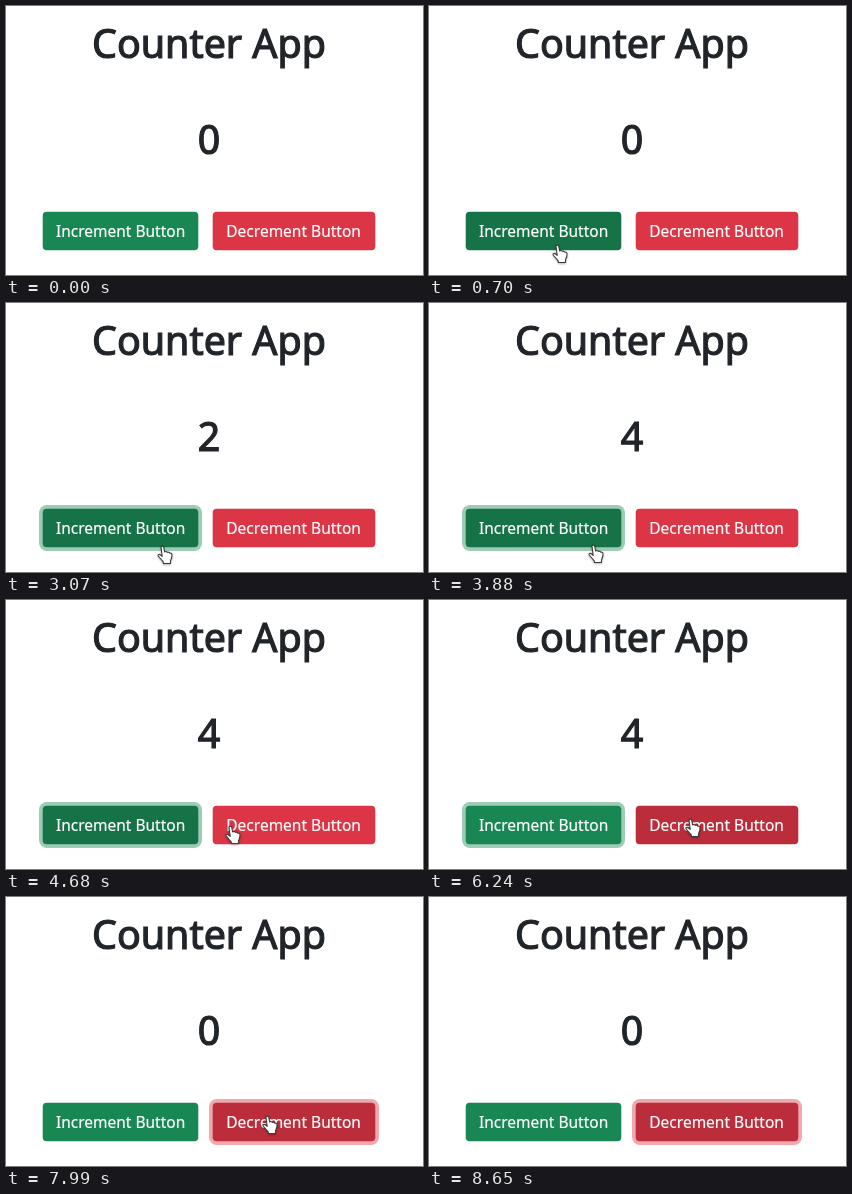
An HTML page that plays this animation: 417x269 px, repeating every 8750 ms.

```html
<!DOCTYPE html>
<html lang="en">
<head>
<meta charset="utf-8">
<title>Counter App</title>
<style>
  html, body { margin: 0; width: 100%; height: 100%; overflow: hidden; background: #fff; }
  svg { display: block; }
  text { font-family: "Noto Sans", "Open Sans", sans-serif; text-anchor: middle; }
  .head { font-size: 39.4px; fill: #212529; stroke: #212529; stroke-width: 1.2; }
  .label { font-size: 15.5px; fill: #fff; stroke: #fff; stroke-width: .2; }
  #cursor { filter: drop-shadow(0 1px 1px rgba(0, 0, 0, .3)); }
  #cursor path { fill: #fff; stroke: #3a3a3a; stroke-width: 1.1; stroke-linejoin: round; }
</style>
</head>
<body>
<svg width="417" height="269" viewBox="0 0 417 269">
  <text class="head" x="203" y="51.7">Counter App</text>
  <text class="head" id="count" x="203" y="147.8">0</text>
  <g id="inc">
    <rect class="ring" x="33" y="202" width="163" height="46" rx="8"/>
    <rect class="face" x="36.7" y="205.7" width="155.6" height="38.6" rx="4"/>
    <text class="label" x="114.6" y="231">Increment Button</text>
  </g>
  <g id="dec">
    <rect class="ring" x="203" y="202" width="170" height="46" rx="8"/>
    <rect class="face" x="206.7" y="205.7" width="162.6" height="38.6" rx="4"/>
    <text class="label" x="287.6" y="231">Decrement Button</text>
  </g>
  <g id="cursor">
    <path id="hand" d="M4 2.5C4 .7 6.5 .7 6.8 2.5L7.6 7C8.5 6.2 9.8 6.4 10.2 7.4 11.2 6.8 12.4 7.2 12.7 8.2 14 7.8 15 8.6 15 10 15 13 14.3 14 13.6 15.5L13.4 18.5H6.5L6 16.5C4.5 15 2.5 12.5 1.2 11 .6 9.6 2.3 8.8 3.6 10L5.2 11.4Z"/>
    <path id="arrow" d="M5 1V15L8.2 12 10.4 17 12.6 16 10.4 11.2H14.6Z"/>
  </g>
</svg>
<script>
const LOOP = 8750, STEP = 90, FADE = 150, LAG = 120;
const ENTER = 110, EXIT = 8640;

const ups = [1000, 2570, 3250, 3720];
const downs = [6460, 6940, 7420, 7990];
const firstPress = 800, switchPress = 6240;

// Cursor stops: time, x, y
const stops = [
  [ENTER, 150, 262], [420, 123, 238], [1330, 123, 238], [1840, 223, 240],
  [2050, 236, 251], [2430, 151, 242], [3070, 151, 242], [3880, 159, 241],
  [4400, 174, 233], [4660, 219, 225], [4970, 256, 218], [8270, 256, 218],
  [EXIT, 262, 240]
];

const buttons = [
  { id: "inc", left: 37, right: 192, base: [25, 135, 84], dark: [21, 115, 71],
    ring: "rgb(60,153,110)", focus: t => ramp(t - firstPress) - ramp(t - switchPress) },
  { id: "dec", left: 207, right: 369, base: [220, 53, 69], dark: [187, 45, 59],
    ring: "rgb(225,83,97)", focus: t => ramp(t - switchPress) }
];

const el = id => document.getElementById(id);
const mix = (a, b, p) => a + (b - a) * p;
const ramp = dt => Math.min(1, Math.max(0, dt / FADE));
const passed = (times, t) => times.filter(at => at <= t).length;

function cursorAt(t) {
  const i = stops.findIndex(s => s[0] > t);
  if (i < 1) return (i < 0 ? stops[stops.length - 1] : stops[0]).slice(1);
  const [t0, x0, y0] = stops[i - 1], [t1, x1, y1] = stops[i];
  const p = ((t - t0) / (t1 - t0)) ** 3;
  return [mix(x0, x1, p), mix(y0, y1, p)];
}

function isOver(b, [x, y]) {
  const tipX = x + 5, tipY = y + 1;
  return tipX > b.left && tipX < b.right && tipY > 206 && tipY < 244;
}

// Averaging recent hover gives a linear fade in and out
function hoverLevel(b, t) {
  const samples = 12;
  let hits = 0;
  for (let k = 0; k < samples; k++) {
    hits += isOver(b, cursorAt(t - LAG - FADE * k / samples));
  }
  return hits / samples;
}

for (const b of buttons) {
  b.face = document.querySelector(`#${b.id} .face`);
  b.glow = document.querySelector(`#${b.id} .ring`);
  b.glow.style.fill = b.ring;
}

function draw(t) {
  el("count").textContent = passed(ups, t) - passed(downs, t);

  for (const b of buttons) {
    const h = hoverLevel(b, t);
    b.face.style.fill = `rgb(${b.base.map((v, i) => Math.round(mix(v, b.dark[i], h)))})`;
    b.glow.style.opacity = 0.5 * b.focus(t);
  }

  const pos = cursorAt(Math.round(t / STEP) * STEP).map(Math.round);
  const over = buttons.some(b => isOver(b, pos));
  el("cursor").style.display = t < ENTER || t >= EXIT ? "none" : "";
  el("cursor").setAttribute("transform", `translate(${pos})`);
  el("hand").style.display = over ? "" : "none";
  el("arrow").style.display = over ? "none" : "";
}

const start = performance.now();
function tick() {
  draw((performance.now() - start) % LOOP);
  requestAnimationFrame(tick);
}
tick();
</script>
</body>
</html>
```
